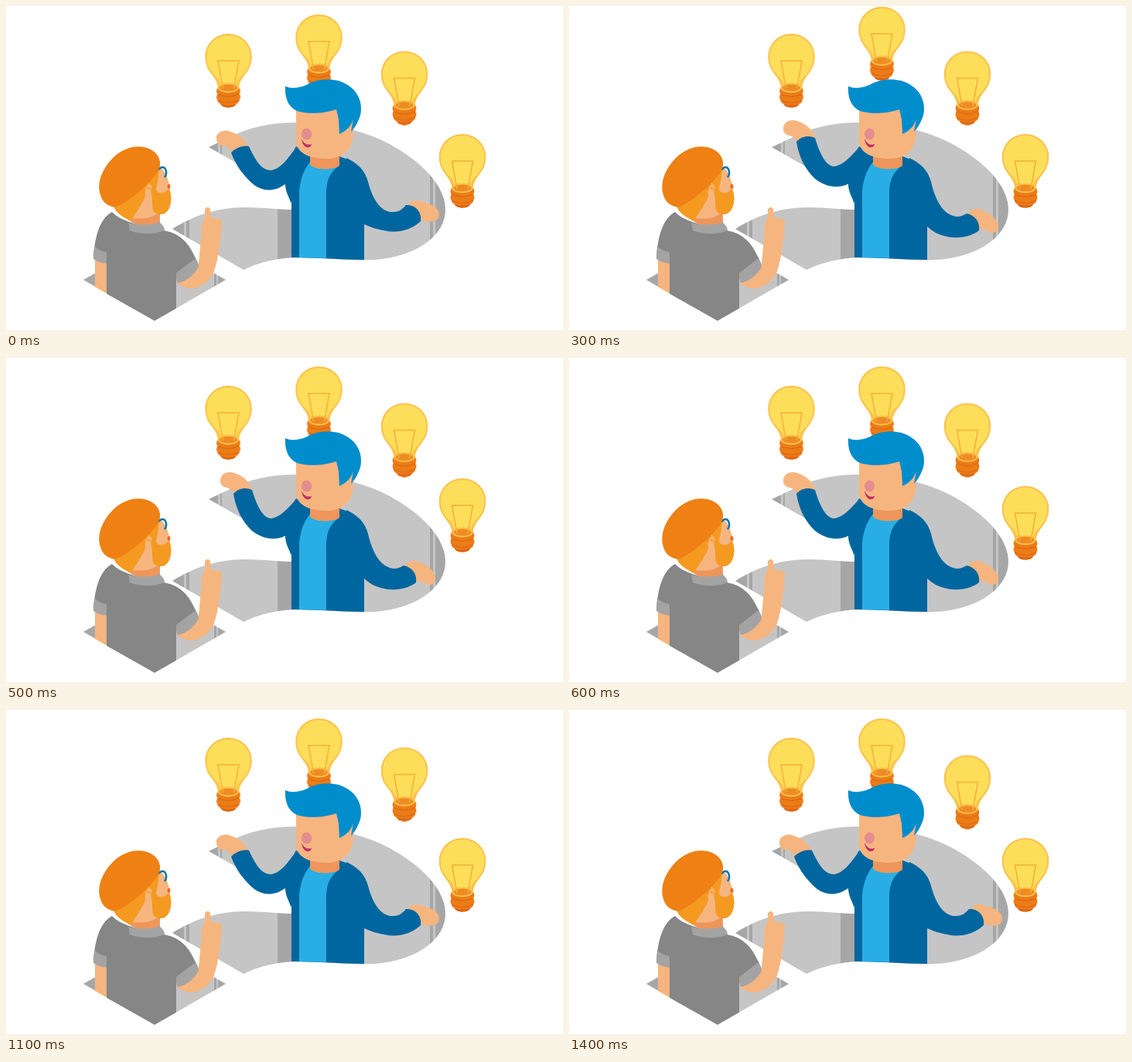
An HTML page for the animation above (1.6 s loop, 720 px wide and 420 px high).

```html
<!DOCTYPE html>
<html lang="en">
<head>
<meta charset="utf-8">
<title>Sharing ideas</title>
<style>
  html, body { margin: 0; width: 100%; height: 100%; overflow: hidden; background: #fff; }
  svg { display: block; width: 100%; height: 100%; }

  /* Each bulb hops once left to right and once on the way back. */
  .bulb {
    animation: hop 1.6s step-end infinite, hop-back 1.6s step-end infinite;
    animation-delay: calc(var(--i) * 100ms - 1400ms), calc(var(--i) * -100ms - 300ms);
  }
  @keyframes hop { 0% { translate: 0 -10px; } 6.25%, 100% { translate: 0 0; } }
  @keyframes hop-back { 0% { transform: translateY(-10px); } 6.25%, 100% { transform: none; } }

  .low { animation: low 1.6s step-end infinite; }
  .high { animation: high 1.6s step-end infinite; }
  @keyframes low { 0%, 62.5%, 100% { opacity: 1; } 12.5% { opacity: 0; } }
  @keyframes high { 0%, 62.5%, 100% { opacity: 0; } 12.5% { opacity: 1; } }

  .skin { fill: #f6b57f; }
  .shade { fill: #ee965b; }
  .jacket { fill: #00669f; }
  .floor { fill: #c5c5c5; }
  .wall { fill: #a6a6a6; }
  .shirt { fill: #868686; }
  .cuff { fill: #a3a3a3; }
  .beard { fill: #f59a20; }
</style>
</head>
<body>
<svg viewBox="0 0 720 420">
  <defs>
    <path id="glass" d="M0 1C17 1 29.300 14 29.300 30C29.300 43 23 49 18 56C14.500 61 13 65 12.500 70Q0 78-12.500 70C-13 65-14.500 61-18 56C-23 49-29.300 43-29.300 30C-29.300 14-17 1 0 1Z"/>
    <clipPath id="inside"><use href="#glass"/></clipPath>
    <g id="bulb">
      <path fill="#ec7c17" d="M-13 69C-16 72-16 76-14 78C-16 80-16 84-14 86C-14 89-12 90-10 91C-8 97 8 97 10 91C12 90 14 89 14 86C16 84 16 80 14 78C16 76 16 72 13 69Z"/>
      <path fill="#dc6513" d="M-10 91Q0 94 10 91C8 97-8 97-10 91Z"/>
      <path fill="none" stroke="#dc6513" stroke-width="1.200" d="M-14 78Q0 85 14 78M-14 86Q0 93 14 86"/>
      <use href="#glass" fill="#fdde5a"/>
      <path clip-path="url(#inside)" fill="#fbc54c" d="M-30 40C-24 55-12 58 0 58S24 55 30 40V80H-30Z"/>
      <path clip-path="url(#inside)" fill="#fdde5a" d="M-24 45C-15 57-11 60-9 70H9C11 60 15 57 24 45Z"/>
      <use href="#glass" fill="none" stroke="#fbc04a" stroke-width="2"/>
      <ellipse cy="70" rx="12.500" ry="5.500" fill="#ee8c24" stroke="#fbc04a" stroke-width="2"/>
      <path fill="none" stroke="#f6ae36" stroke-width="1.500" d="M-7 71L-13.500 35H13.500L7 71"/>
    </g>
    <clipPath id="mark">
      <path d="M262 183L300 165C323 155 350 151 376 151C424 151 475 164 511 188C548 212 568 239 568 264C568 298 530 325 476 329C440 331 408 325 374 326C347 327 326 333 307 342L215 289C240 273 271 261 309 261C333 261 351 264 369 264L380 230H345L304 207Z"/>
    </clipPath>
    <clipPath id="dot"><path d="M100 355L192 302L284 355L192 408Z"/></clipPath>
  </defs>

  <g transform="translate(287.500 36)"><use class="bulb" href="#bulb" style="--i:0"/></g>
  <g transform="translate(404.500 11)"><use class="bulb" href="#bulb" style="--i:1"/></g>
  <g transform="translate(515 58.500)"><use class="bulb" href="#bulb" style="--i:2"/></g>
  <g transform="translate(590 166)"><use class="bulb" href="#bulb" style="--i:3"/></g>

  <g clip-path="url(#mark)">
    <path class="floor" d="M210 145H575V350H210Z"/>
    <path class="wall" d="M260 160h14v40h-14zM277 160h2v50h-2zM210 270h20v40h-20zM233 270h4v50h-4zM351 255h20v85h-20zM548 200h4v115h-4zM555 200h15v115h-15z"/>
  </g>
  <g clip-path="url(#dot)">
    <path class="floor" d="M100 300H284V410H100Z"/>
    <path class="wall" d="M100 300H150V410H100ZM269 335h3v40h-3zM274 335h12v40h-12z"/>
  </g>

  <!-- Speaker -->
  <g class="low">
    <path class="skin" d="M272 172C271 164 282 159 290 163C301 166 310 173 314 183L294 195C291 186 288 182 281 181C276 181 272 178 272 172Z"/>
    <path class="skin" d="M516 264C520 255 528 248 534 253C545 255 560 260 560 270C560 280 549 282 535 277L522 279Z"/>
    <path class="jacket" d="M314 182C322 199 330 213 342 213C354 212 364 199 375 183L400 205L368 255L361 231C344 243 328 240 315 227C304 216 296 204 291 190C296 185 305 180 314 182Z"/>
    <path class="jacket" d="M440 197C455 204 464 213 468 228C475 254 486 268 501 267C508 267 513 263 517 258C529 257 538 267 536 279C523 291 505 295 489 291C477 289 470 286 463 283L440 270Z"/>
  </g>
  <g class="high">
    <path class="skin" d="M277 159C277 150 286 146 295 149C304 152 313 157 318 170L295 178C294 172 290 169 285 168C280 167 277 164 277 159Z"/>
    <path class="skin" d="M513 275C516 265 525 260 532 264C542 267 553 275 555 284C556 293 547 297 540 291C535 288 532 289 528 291Z"/>
    <path class="jacket" d="M318 171C324 191 332 208 343 208C354 206 363 197 375 183L400 205L368 255L362 230C347 238 331 234 318 224C305 212 297 195 294 176C300 169 310 167 318 171Z"/>
    <path class="jacket" d="M440 197C455 204 464 213 468 228C475 258 487 272 502 273C507 273 510 271 514 269C525 271 532 281 530 291C520 299 502 303 485 298C476 296 469 291 463 286L440 270Z"/>
  </g>
  <path class="jacket" d="M374 183C382 180 389 188 395 195H431C450 201 464 211 468 230L463 260V329C432 329 405 326 369 326V255C364 245 360 238 361 225Z"/>
  <path fill="#28aee4" d="M393 202L402 206H431C419 216 414 225 414 243V327L379 326V241C380 225 385 212 393 202Z"/>
  <path class="shade" d="M393 190H431V207C424 213 400 213 393 206Z"/>
  <path class="skin" d="M375 132H430L449 146V164C449 184 436 198 415 198C393 198 376 191 375 176Z"/>
  <path fill="#008dcc" d="M361 104C370 108 380 106 389 102C402 94 426 92 441 102C460 113 462 135 456 147C453 154 450 159 446 163L449 146C447 155 440 162 431 166L430 147L427 134C413 139 392 141 376 136C365 131 360 119 361 104Z"/>
  <ellipse cx="388.500" cy="166" rx="6.500" ry="7.500" fill="#e58c91"/>
  <path fill="#c12f68" d="M382 172C385 179 390 181 395 179C394 186 383 185 382 172Z"/>

  <!-- Listener -->
  <path class="skin" d="M115 329H131V373L115 364Z"/>
  <path class="skin" d="M219 355L249 334L253 290C253 281 254 278 257 275V264C258 260 264 260 264 264L265 274C271 276 279 274 279 281C277 304 275 326 269 344C262 359 249 367 238 366C230 366 223 362 219 355Z"/>
  <path class="cuff" d="M217 346L244 325C247 329 249 334 249 338C243 349 233 357 222 359Z"/>
  <path class="shirt" d="M137 267C148 278 163 281 181 286L204 291C228 295 238 311 245 327L220 346V392L192 408L130 373V334L113 325C115 303 119 277 137 267Z"/>
  <path class="cuff" d="M114 311C119 316 124 318 130 319V334C123 333 117 331 113 328Z"/>
  <path class="shade" d="M162 265H199V283C189 289 171 286 161 279Z"/>
  <path class="skin" d="M157 260L182 230L196 207C204 211 208 219 210 228C214 234 212 238 209 240L198 267C190 275 177 277 162 275Z"/>
  <path class="cuff" d="M158 281C171 284 188 285 198 280C202 283 205 287 205 291C190 297 171 296 160 291Z"/>
  <path class="beard" d="M139 259C160 251 176 240 184 228C184 245 176 256 161 279C151 273 142 269 139 259Z"/>
  <path class="beard" d="M197 207C199 220 195 228 194 238C198 245 205 243 211 237C215 246 214 257 210 264C205 272 197 271 191 267C188 259 190 248 187 240L184 226Z"/>
  <path class="skin" d="M181 236C183 229 190 230 188 238L185 251C180 250 178 242 181 236Z"/>
  <path fill="none" stroke="#f59a20" stroke-width="1.500" d="M182 237Q186 234 187 239"/>
  <ellipse cx="210.500" cy="234" rx="2" ry="3" fill="#e9692e"/>
  <path fill="none" stroke="#0075b1" stroke-width="2.500" d="M197 212L201 209C207 208 209 217 205 222"/>
  <path fill="#ee8014" d="M121 241C117 222 132 198 150 188C168 178 188 182 196 194C202 203 199 213 192 220C180 236 161 252 141 261C129 259 123 252 121 241Z"/>
</svg>
</body>
</html>
```
